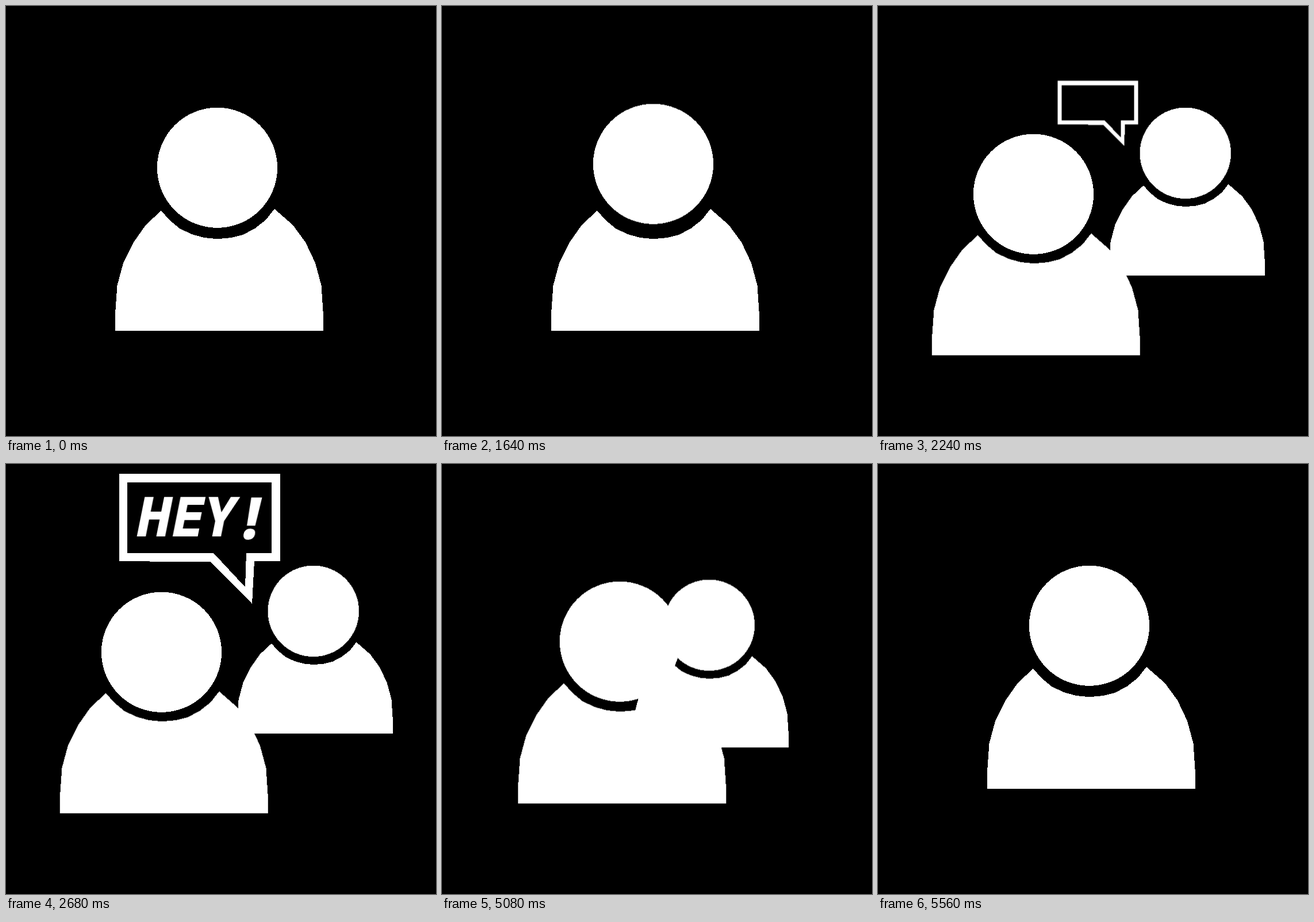
These frames come from a looping animation (748x748 px, 6400 ms). An HTML page:

```html
<!DOCTYPE html>
<html lang="en">
<head>
<meta charset="utf-8">
<title>Hey!</title>
<style>
  html, body { margin: 0; width: 100%; height: 100%; overflow: hidden; background: #000; }
  svg { display: block; width: 100vw; height: 100vh; fill: #fff; shape-rendering: crispEdges; }
  text { font: bold 92.5px "Noto Sans Mono", "DejaVu Sans Mono", monospace; stroke: #fff; stroke-width: 2px; }
  .bang { font-size: 99px; }

  .head, .body, .friend, .bubble, .letter { animation: 6400ms linear infinite both; }
  .head { animation-name: head; }
  .body { animation-name: body; }
  .friend { animation-name: friend, meet; }
  .bubble { animation-name: bubble, speak; transform-origin: 428px 243px; }
  .letter { animation-name: drop; animation-timing-function: step-end; animation-delay: calc(var(--i) * 80ms); }

  /* jump, settle, step aside, return */
  @keyframes head {
    0% { transform: translate(0, 0); }
    18.125% { transform: translate(0, 0); animation-timing-function: cubic-bezier(.33, .67, .67, 1); }
    21.875% { transform: translate(0, -158px); animation-timing-function: cubic-bezier(.33, 0, .67, .33); }
    25.625% { transform: translate(0, -6.5px); animation-timing-function: steps(3); }
    27.5% { transform: translate(0, 0); animation-timing-function: steps(10); }
    33.75% { transform: translate(-97px, 46px); }
    74.375% { transform: translate(-97px, 46px); animation-timing-function: steps(20); }
    86.875%, 100% { transform: translate(0, 0); }
  }
  @keyframes body {
    0% { transform: translate(0, 0); }
    27.5% { transform: translate(0, 0); animation-timing-function: steps(10); }
    33.75% { transform: translate(-96.2px, 42.6px); }
    74.375% { transform: translate(-96.2px, 42.6px); animation-timing-function: steps(20); }
    86.875%, 100% { transform: translate(0, 0); }
  }
  @keyframes friend {
    0% { transform: translate(-185px, 66px); }
    27.5% { transform: translate(-185px, 66px); animation-timing-function: steps(10); }
    33.75% { transform: translate(0, 0); }
    74.375% { transform: translate(0, 0); animation-timing-function: steps(20); }
    86.875%, 100% { transform: translate(-175px, 61px); }
  }
  @keyframes meet {
    0%, 86.875%, 100% { opacity: 0; animation-timing-function: step-end; }
    28.125% { opacity: 1; animation-timing-function: step-end; }
  }
  @keyframes bubble {
    0% { transform: scale(0); }
    33.75% { transform: scale(0); animation-timing-function: steps(4); }
    36.25%, 100% { transform: scale(1); }
  }
  @keyframes speak {
    0%, 74.375%, 100% { opacity: 0; animation-timing-function: step-end; }
    33.75% { opacity: 1; animation-timing-function: step-end; }
  }
  @keyframes drop {
    0% { opacity: 0; transform: translate(0, -16px); }
    37.5% { opacity: 1; transform: translate(0, -16px); }
    38.125%, 100% { opacity: 1; transform: translate(0, 0); }
  }
</style>
</head>
<body>
<svg viewBox="0 0 748 748">
  <defs>
    <circle id="head" cx="367.5" cy="281.3" r="104.6"/>
    <path id="body" d="M190.300 565V531L193.500 486L204 447L222 411L243 381L270 356
      L284 372L302 387L323 397L345 403L368 405.300L392 403L412 398L433 387L452 372L467 353
      L499 381L521 411L538 447L548.500 486L551.500 531V565Z"/>
  </defs>

  <g class="friend">
    <use href="#head" transform="translate(256.1 42.7) scale(.758)"/>
    <use href="#body" transform="translate(259.7 45.5) scale(.749)"/>
  </g>
  <use class="body" href="#body"/>
  <use class="head" href="#head"/>

  <g class="bubble">
    <path fill-rule="evenodd" d="M197 17H477V169H432L428 243L356 170.500L197 169Z
      M211 32V155H361L416 214L418 155H462V32Z"/>
    <g class="letter" style="--i:0"><text transform="translate(224.7 125) skewX(-11.3)">H</text></g>
    <g class="letter" style="--i:1"><text transform="translate(283.7 125) skewX(-11.3)">E</text></g>
    <g class="letter" style="--i:2"><text transform="translate(338.7 125) skewX(-11.3)">Y</text></g>
    <g class="letter" style="--i:3"><text class="bang" transform="translate(392 130) skewX(-11.3)">!</text></g>
  </g>
</svg>
</body>
</html>
```
